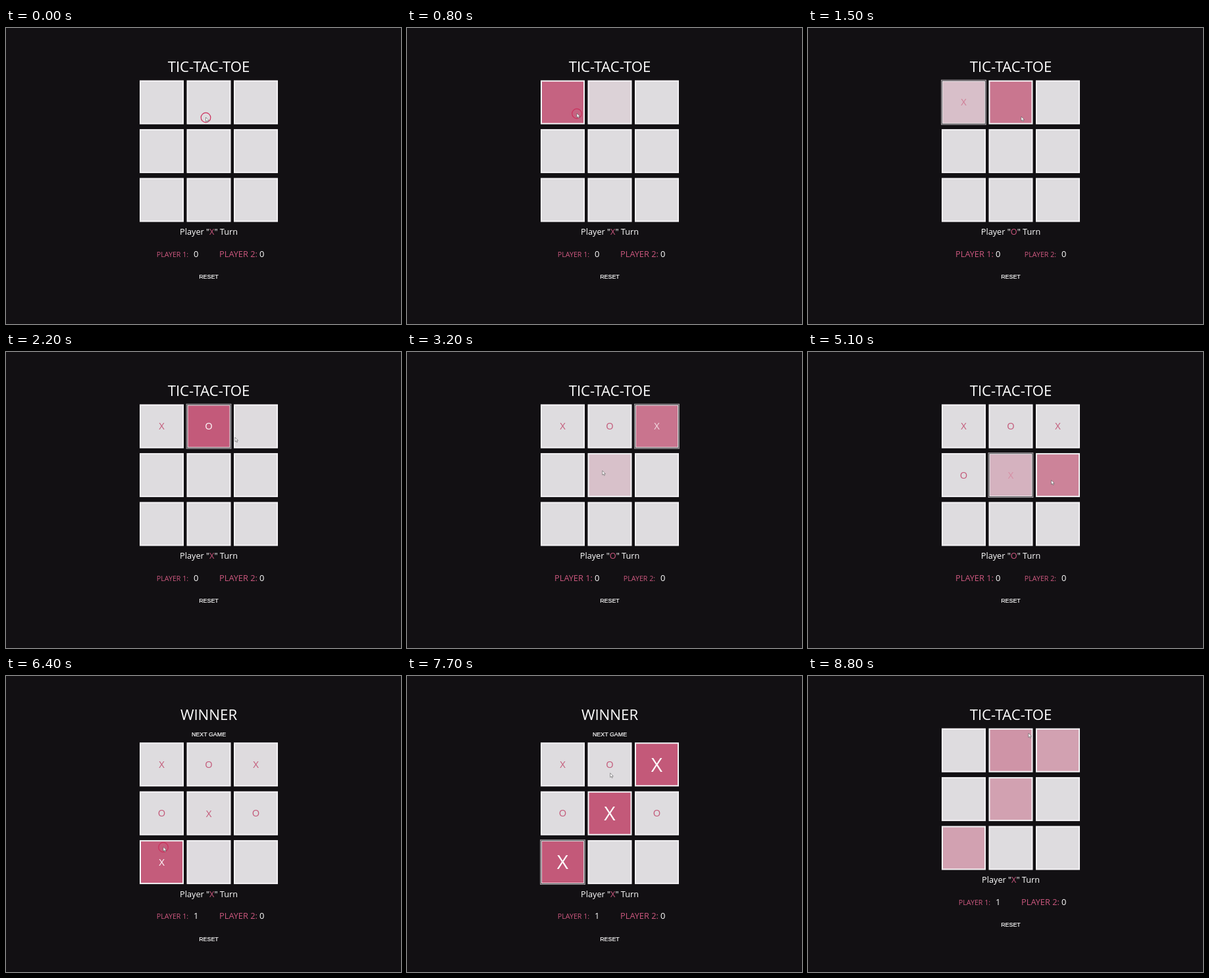
Animation, 600 px wide and 451 px high, one loop 8900 ms. Source, as an HTML page:

```html
<!DOCTYPE html>
<html lang="en">
<head>
<meta charset="utf-8">
<title>Tic-tac-toe</title>
<style>
  html, body { margin: 0; width: 100%; height: 100%; overflow: hidden; background: #121013; }
  svg { display: block; width: 600px; height: 451px; font-family: "Open Sans", "Noto Sans", sans-serif; }
  text { fill: #fff; font-weight: 500; }
  .mid { text-anchor: middle; }
  .button { font: 8.9px "Liberation Sans", Arial, sans-serif; stroke: #fff; stroke-width: .2; }
  .pink { fill: #cb577e; font-weight: 400; }
</style>
</head>
<body>
<svg viewBox="0 0 600 451">
  <text id="title" class="mid" x="308" y="67" font-size="22.2"></text>
  <text id="next" class="mid button" x="308" y="91.7">NEXT GAME</text>
  <g id="game">
    <g id="board"></g>
    <text class="mid" x="308" y="315.2" font-size="12.7">Player "<tspan id="turn" class="pink"></tspan>" Turn</text>
    <text id="label1" class="mid pink" x="253" y="348.7">PLAYER 1:</text>
    <text id="score1" x="285" y="348.7" font-size="12.9"></text>
    <text id="label2" class="mid pink" x="353" y="348.7">PLAYER 2:</text>
    <text x="385" y="348.7" font-size="12.9">0</text>
    <text class="mid button" x="308" y="382.2">RESET</text>
  </g>
  <circle id="ring" r="7.3" fill="none" stroke="#cc2f5c" stroke-width="1.2"/>
  <path id="cursor" d="M0 0V6.5L1.5 5.1L2.6 7.5L3.7 7L2.7 4.8H4.6Z" fill="#fff" stroke="#555" stroke-width=".6"/>
</svg>
<script>
const LOOP = 8900, STEP = 100, FADE = 500;
const FIRST_CLICK = 880, GAP = 917, MOVES = 7;
const GLIDE_DELAY = 250, GLIDE = 400;
const LEFT = 203, TOP = 79.7, SIZE = 67, PITCH_X = 71.5, PITCH_Y = 74.4;
const SMALL = 14.7, BIG = 30, WIN_SHIFT = 21.6;
const GREY = [222, 220, 223], PINK = [195, 89, 121], WHITE = [255, 255, 255];

// Cursor rest points: the start, cells 0 to 6, then the way to the next game
const RESTS = [
  [303.5, 136], [258, 130], [325, 135], [395, 120], [240, 216], [339, 191],
  [375, 196], [239, 260.5], [309, 176], [308, 88], [337, 87]
];

const clickTime = move => FIRST_CLICK + GAP * move;
const WIN = clickTime(MOVES - 1), RESTART = 8640;
const isWon = t => t >= WIN && t < RESTART;
const isWinner = cell => cell > 0 && cell < 8 && cell % 2 === 0;

const $ = id => document.getElementById(id);
const clamp = v => Math.min(1, Math.max(0, v));
const mix = (a, b, p) => a + (b - a) * p;
const blend = (a, b, p) => `rgb(${a.map((v, i) => Math.round(mix(v, b[i], p)))})`;
const bezier = (a, b, s) => 3 * a * s * (1 - s) ** 2 + 3 * b * s * s * (1 - s) + s ** 3;

// The CSS "ease" curve
function ease(p) {
  let lo = 0, hi = 1;
  for (let i = 0; i < 16; i++) {
    const mid = (lo + hi) / 2;
    if (bezier(.25, .25, mid) < clamp(p)) lo = mid; else hi = mid;
  }
  return bezier(.1, 1, lo);
}

function set(node, attrs) {
  for (const name in attrs) node.setAttribute(name, attrs[name]);
}

function add(parent, tag, attrs) {
  const node = document.createElementNS(parent.namespaceURI, tag);
  set(node, attrs);
  return parent.appendChild(node);
}

const show = (node, visible) => { node.style.display = visible ? '' : 'none'; };

// After each beat the cursor waits, then glides to the next rest point.
function cursorAt(t) {
  return RESTS.reduce(([x, y], [nextX, nextY], i) => {
    const p = clamp((t - clickTime(i - 2) - GLIDE_DELAY) / GLIDE);
    const s = p * p * (3 - 2 * p);
    return [mix(x, nextX, s), mix(y, nextY, s)];
  });
}

function isLit(cell, t) {
  if (isWon(t)) return isWinner(cell);
  const [x, y] = cursorAt(t);
  const column = Math.floor((x - LEFT + 2) / PITCH_X);
  const row = Math.floor((y - TOP + 3) / PITCH_Y);
  return cell === row * 3 + column;
}

// Spells during which a cell is lit, as { from, to }
function findSpells(cell) {
  const spells = [];
  let current = null;
  for (let t = 0; t < LOOP; t += 10) {
    if (!isLit(cell, t)) current = null;
    else if (current) current.to = t + 10;
    else spells.push(current = { from: t, to: t + 10 });
  }
  return spells;
}

function litLevel(spells, t) {
  const levels = spells.filter(({ from }) => t >= from).map(({ from, to }) =>
    ease((Math.min(t, to) - from) / FADE) * (1 - ease((t - to) / FADE)));
  return Math.max(0, ...levels);
}

const cells = Array.from({ length: 9 }, (_, i) => {
  const x = LEFT + PITCH_X * (i % 3), y = TOP + PITCH_Y * Math.floor(i / 3);
  const square = (parent, inset, attrs) => add(parent, 'rect', {
    x: x + inset, y: y + inset, width: SIZE - 2 * inset, height: SIZE - 2 * inset, ...attrs
  });
  const face = square($('board'), 1, { stroke: '#f4f2f5', 'stroke-width': 2 });
  const focus = add($('board'), 'g', { fill: 'none' });
  square(focus, -.4, { stroke: '#aaa6aa' });
  square(focus, .6, { stroke: '#4b484c' });
  const mark = add($('board'), 'text', { class: 'mid', x: x + SIZE / 2 });
  return { face, focus, mark, middle: y + SIZE / 2, spells: findSpells(i) };
});

function drawCell({ face, focus, mark, middle, spells }, i, t, played) {
  const level = litLevel(spells, t);
  const grow = isWinner(i) ? ease((t - WIN) / FADE) : 0;
  const size = mix(SMALL, BIG, grow);
  set(face, { fill: blend(GREY, PINK, level) });
  show(focus, i === played - 1 && t > clickTime(i) + 60);
  mark.textContent = i < played ? 'XO'[i % 2] : '';
  set(mark, { y: middle + size * .357, 'font-size': size });
  mark.style.fill = blend(PINK, WHITE, level);
}

function draw(t) {
  const won = isWon(t);
  const clicks = Math.max(0, Math.floor((t - FIRST_CLICK) / GAP) + 1);
  const played = t < RESTART ? Math.min(MOVES, clicks) : 0;
  const xTurn = won || played % 2 === 0;

  $('title').textContent = won ? 'WINNER' : 'TIC-TAC-TOE';
  show($('next'), won);
  set($('game'), { transform: `translate(0 ${won ? WIN_SHIFT : 0})` });
  $('turn').textContent = xTurn ? 'X' : 'O';
  $('score1').textContent = t >= WIN ? 1 : 0;
  set($('label1'), { 'font-size': xTurn ? 10.7 : 12.8 });
  set($('label2'), { 'font-size': xTurn ? 12.8 : 10.7 });
  cells.forEach((cell, i) => drawCell(cell, i, t, played));

  const [x, y] = cursorAt(t);
  const move = Math.min(MOVES - 1, Math.round((t - FIRST_CLICK) / GAP));
  const pressed = [clickTime(move), RESTART].some(time => Math.abs(t - time) < 100);
  set($('cursor'), { transform: `translate(${x} ${y})` });
  set($('ring'), { cx: x, cy: y + .5 });
  show($('ring'), pressed);
}

const start = performance.now();
function tick(now) {
  const t = Math.max(0, now - start) % LOOP;
  draw(Math.floor(t / STEP) * STEP);
  requestAnimationFrame(tick);
}
draw(0);
requestAnimationFrame(tick);
</script>
</body>
</html>
```
